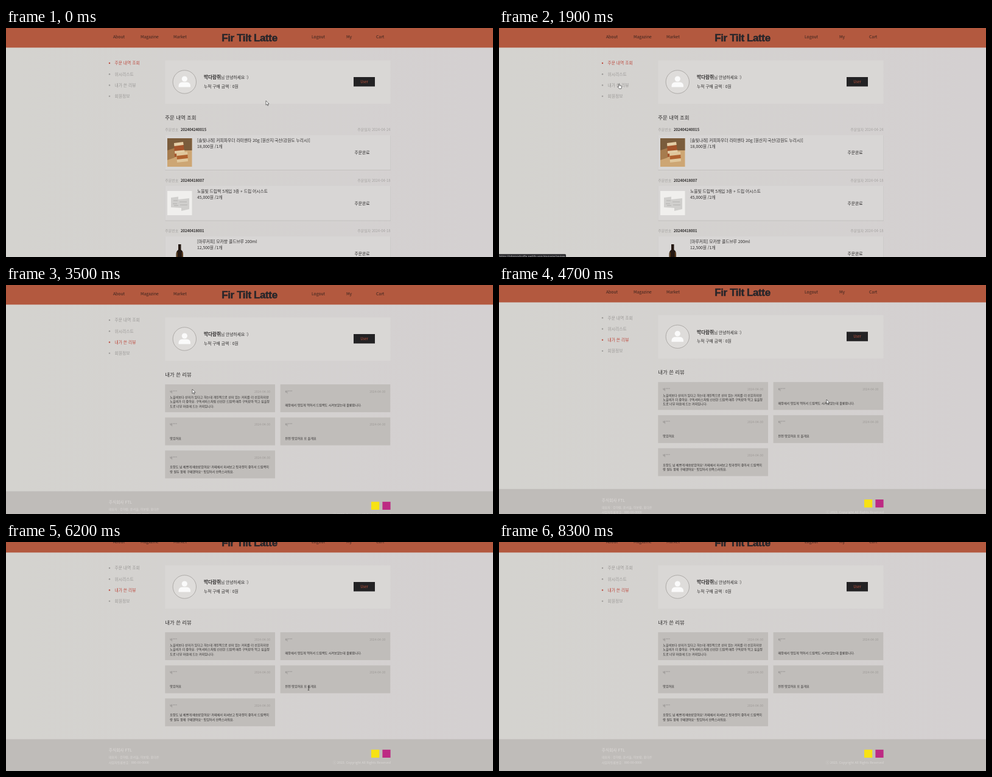
An HTML page for the animation above (8.6 s loop, 800 px wide and 378 px high).

```html
<!DOCTYPE html>
<html lang="ko">
<head>
<meta charset="utf-8">
<title>My page</title>
<style>
  html, body { margin: 0; width: 100%; height: 100%; overflow: hidden; background: #d4d2d0; }
  svg { display: block; width: 800px; height: 378px; font-family: "Noto Sans CJK KR", "Noto Sans KR", "Noto Sans CJK", sans-serif; }
  text { white-space: pre; }
  .brand { font-family: "Liberation Sans", Arial, sans-serif; letter-spacing: -.4px; stroke: #28262a; stroke-width: .5; }
  .status { font-family: "Noto Sans", sans-serif; }
</style>
</head>
<body>
<svg id="stage" viewBox="0 0 800 378"></svg>
<script>
const LOOP = 8600, SCROLL = 15;
const INK = '#2d2b2b', GREY = '#9b9997', RED = '#bd4c40';
const BODY = 6.77, SMALL = 5.96, TINY = 5.08;

const rect = (x, y, w, h, fill, extra = '') =>
  `<rect x="${x}" y="${y}" width="${w}" height="${h}" fill="${fill}" ${extra}/>`;
const path = (d, fill, extra = '') => `<path d="${d}" fill="${fill}" ${extra}/>`;
// Text is placed by the middle of its line.
const label = (x, mid, str, size = BODY, fill = INK, extra = '') =>
  `<text x="${x}" y="${mid + size * .365}" font-size="${size}" fill="${fill}" ${extra}>${str}</text>`;
const END = 'text-anchor="end"', MIDDLE = 'text-anchor="middle"';
const BOLD = 'font-weight="700"', MEDIUM = 'font-weight="500"';

const backdrop = `<linearGradient id="tint"><stop stop-color="#d4d3cf"/><stop offset="1" stop-color="#d4d0d1"/></linearGradient>` +
  rect(0, 0, 800, 378, 'url(#tint)');

const header = rect(0, 0, 800, 32.4, '#b3593f') +
  [[176, 'About'], [221, 'Magazine'], [275, 'Market'], [502, 'Logout'], [559, 'My'], [608, 'Cart']]
    .map(([x, s]) => label(x, 15, s, BODY, '#38231e')).join('') +
  label(400, 15.3, 'Fir Tilt Latte', 17, '#28262a', `class="brand" ${BOLD} ${MIDDLE}`);

const sidebar = ['주문 내역 조회', '위시리스트', '내가 쓴 리뷰', '회원정보'].map((s, i) => {
  const y = 58 + i * 18.2;
  return `<g class="item" fill="${GREY}"><circle cx="170" cy="${y}" r="1.2"/>${label(178.5, y, s, BODY, 'inherit')}</g>`;
}).join('');

const profile = rect(261.5, 53.5, 370, 71.5, '#d9d7d5') +
  '<circle cx="293.3" cy="89" r="19.2" fill="#dedcda" stroke="#8d8a87" stroke-width=".6"/>' +
  '<circle cx="293.3" cy="84" r="4.6" fill="#fafafa"/>' +
  path('M283.5 97.5V95Q284 89.5 290 89.5H296.5Q302.5 89.5 303 95V97.5Z', '#fafafa') +
  label(325, 82, `<tspan font-size="7.6" ${BOLD}>박다람쥐</tspan>님 안녕하세요 :)`) +
  label(325, 96.7, '누적 구매 금액 : 0원') +
  rect(571, 81, 35, 15.5, '#232224') + label(588.5, 89, 'User', SMALL, '#b9523d', MIDDLE);

const heading = s => label(261.3, 148, s, 8.45, INK, MEDIUM);

const pouches = rect(265, 182, 40.5, 47, '#cda674') + rect(265, 182, 40.5, 20, '#7a5c3c') +
  path('M265 202L277 198V214L265 218Z', '#a67c4e') +
  path('M276 190L291 188L294 211L277 213Z', '#a4542c') + path('M276 190L291 188L291.7 193L276.4 195Z', '#e3cfa8') +
  path('M277 203L293 201.5L294 206L277.3 207.5Z', '#e3cfa8') +
  path('M280 206L298 204L299 220L281 222Z', '#e0c79c') + path('M280.5 211L298.4 209L298.8 215L280.8 217Z', '#b0622f');
const dripBags = rect(265, 269, 40.5, 40, '#f0efed') +
  path('M271 280L283 278.5V283L301 281V299L288 302V297L271 296Z', '#d0cfcd') +
  path('M275 285H282M285 287H297M274 290H281M286 292H298M276 293H283', 'none', 'stroke="#aaa9a7" stroke-width=".8"');
const bottle = path('M283 357H287.5V366Q291 368.5 291 373V390H279.5V373Q279.5 368.5 283 366Z', '#241812') +
  path('M281 370V378M289.8 370V378', 'none', 'stroke="#9a6a30" stroke-width=".9"');

const orders = [
  ['202404240015', '2024-04-24', '[솔빛나래] 커피파우더 라미엔타 20g [원산지:국산(강원도 누리시)]', '18,000원 /1개', pouches],
  ['20240418007', '2024-04-18', '노을빛 드립백 5개입 3종 + 드립 어시스트', '45,000원 /2개', dripBags],
  ['20240418001', '2024-04-18', '[마루커피] 모카향 콜드브루 200ml', '12,500원 /1개', bottle],
].map(([id, date, name, price, picture], i) => {
  const y = 168 + i * 83.5;
  return label(261.3, y, '주문번호', SMALL, '#a5a3a1') + label(287, y, id, SMALL, INK, BOLD) +
    label(631.5, y, '주문일자 ' + date, SMALL, '#a5a3a1', END) +
    rect(261.5, y + 9.5, 370.5, 57.5, '#c3c1bf') + rect(261.5, y + 9, 370, 57, '#d8d6d5') +
    picture + label(314, y + 18, name) + label(314, y + 27.7, price) + label(572.5, y + 37.7, '주문완료');
}).join('');

const reviews = [
  ['노을비보다 산미가 있다고 하는데 개인적으로 산미 있는 커피를 더 선호하지만',
    '노을비가 더 좋아요. 구독서비스처럼 신선한 드립백 매주 구독받아 먹고 싶을정', '도로 너무 마음에 드는 커피입니다.'],
  ['매장에서 맛있게 먹어서 드립백도 시켜보았는데 훌륭합니다.'],
  ['맛있어요'],
  ['완전 맛있어요 또 올게요'],
  ['포장도 넘 예쁘게 배송받았어요! 카페에서 마셔보고 맛과향이 좋아서 드립백이',
    '랑 원두 함께 구매했어요~ 맛있어서 만족스러워요.'],
].map((lines, i) => {
  const x = 261.3 + i % 2 * 189.3, y = 164 + Math.floor(i / 2) * 54.6;
  const last = y + (lines.length > 2 ? 35.8 : 34.5);
  return rect(x, y, 180.7, 46, '#c0bdba') +
    label(x + 8, y + 11.7, '박***', TINY, '#858280') +
    label(x + 172.7, y + 11.7, '2024-04-30', TINY, '#9f9c99', END) +
    lines.map((s, n) => label(x + 8, last - (lines.length - 1 - n) * 7.2, s, TINY)).join('');
}).join('');

const footer = rect(0, 340.5, 800, 60, '#bfbcb9') +
  label(168.7, 359, '주식회사 FTL', BODY, '#dddad8', MEDIUM) +
  label(168.7, 370.6, `<tspan ${MEDIUM}>대표자</tspan> : 강하람, 윤서울, 이보람, 홍다온`, TINY, '#dad7d5') +
  label(168.7, 379, `<tspan ${MEDIUM}>사업자등록번호</tspan> : 000-00-0000`, TINY, '#dad7d5') +
  label(632, 379, 'ⓒ 2023. Copyright All Rights Reserved', 5.3, '#dad7d5', END) +
  rect(600, 357.8, 13.2, 13.2, '#f7e214') + rect(618.4, 357.8, 13.2, 13.2, '#bd2a83');

const outline = 'stroke="#222" stroke-width=".6" stroke-linejoin="round"';
const pointers = {
  arrow: path('M0 0V7.2L1.7 5.7L2.8 8.2L4 7.7L2.9 5.3H5.1Z', '#fff', outline),
  hand: path('M.3 1Q1-.2 1.6 1V3.4L4.4 4Q5.2 4.3 5 5.5L4.4 8.6H1L-1.4 5.3Q-1.3 4.2 .3 5.3Z', '#fff', outline),
  beam: path('M-1.3-1H1.3M0-1V5.5M-1.3 5.5H1.3', 'none', 'stroke="#333" stroke-width=".7"'),
};

const stage = document.getElementById('stage');
stage.innerHTML = backdrop +
  `<g id="page">${header}${sidebar}${profile}
    <g id="orders">${heading('주문 내역 조회')}${orders}</g>
    <g id="reviews">${heading('내가 쓴 리뷰')}${reviews}${footer}</g></g>
  <g id="status"><rect id="bar" x="-3" y="373.3" height="9" rx="1.5" fill="#29292c"/>
    ${label(0, 377.3, 'https://ohgoodcoffe.netlify.app/mypage/review', 4.9, '#c5c5c8', 'class="status"')}</g>
  <g id="pointer">${Object.entries(pointers).map(([k, s]) => `<g id="${k}">${s}</g>`).join('')}</g>`;

const $ = id => document.getElementById(id);
const items = document.querySelectorAll('.item');
const show = (id, on) => $(id).setAttribute('display', on ? 'inline' : 'none');
const ramp = (t, from, to) => Math.min(1, Math.max(0, (t - from) / (to - from)));
const mix = p => `color-mix(in srgb, ${RED} ${p * 100}%, ${GREY})`;

// Pointer stops: time, x, y
const route = [
  [0, 427, 120], [400, 427, 120], [800, 325, 113], [1300, 196, 91.5], [2700, 197, 91.5],
  [3100, 240, 135], [3500, 306, 172], [4400, 306, 172], [4700, 538, 189], [5000, 538, 189],
  [5300, 497, 196], [5600, 335, 210], [5900, 410, 240], [6200, 497, 239],
  [6700, 446.3, 290.3], [7300, 446.3, 290.3], [7600, 485, 170], [7900, 394, 2], [LOOP, 394, 2],
];

function pointerAt(t) {
  const i = route.findIndex(([end]) => end > t);
  const [t0, x0, y0] = route[i - 1], [t1, x1, y1] = route[i];
  const p = (t - t0) / (t1 - t0);
  return [x0 + (x1 - x0) * p, y0 + (y1 - y0) * p];
}

function draw(now) {
  const t = Math.floor(now % LOOP / 100) * 100;
  const reviewing = t >= 2100;
  show('orders', !reviewing);
  show('reviews', reviewing);
  $('page').setAttribute('transform', `translate(0 ${-SCROLL * ramp(t, 4650, 4850)})`);

  const swap = ramp(t, 2000, 2300);
  items[0].style.fill = mix(1 - swap);
  items[2].style.fill = mix(swap);

  show('status', t >= 1300 && t < 3000);
  $('bar').setAttribute('width', 113 + 156 * ramp(t, 1900, 2200));

  const kind = t >= 1200 && t < 2900 ? 'hand' : t >= 6100 && t < 6300 ? 'beam' : 'arrow';
  Object.keys(pointers).forEach(k => show(k, k === kind));
  show('pointer', t < 7900);
  $('pointer').setAttribute('transform', `translate(${pointerAt(t)})`);
  requestAnimationFrame(draw);
}
requestAnimationFrame(draw);
</script>
</body>
</html>
```
